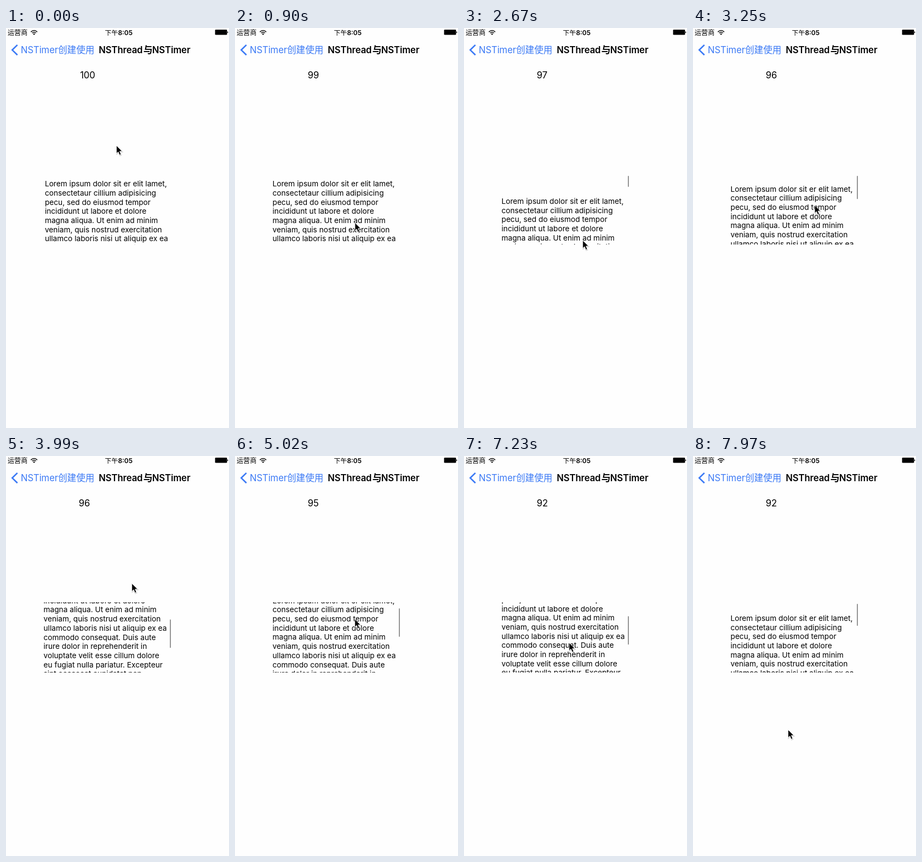
Write an HTML page that moves like this. It is 407x730 px and loops after 8 s.

```html
<!DOCTYPE html>
<html lang="zh-CN">
<head>
<meta charset="utf-8">
<title>NSThread与NSTimer</title>
<style>
  html, body { margin: 0; width: 100%; height: 100%; overflow: hidden; background: #fefefe; }
  svg { display: block; width: 407px; height: 730px; }
  text { font-family: Inter, "Noto Sans CJK SC", "Noto Sans CJK", sans-serif; letter-spacing: -.1px; white-space: pre; }
  .nav { font-size: 16.7px; }
  .blue { fill: #3c7af5; }
  .bold { font-weight: 600; }
  .status { font-size: 12.2px; }
  .time { font-size: 11.9px; letter-spacing: 0; }
  #body text { font-size: 13.7px; letter-spacing: 0; }
</style>
</head>
<body>
<svg viewBox="0 0 407 730" xmlns="http://www.w3.org/2000/svg">
  <defs>
    <clipPath id="view"><rect x="60" y="267" width="245" height="128.3"/></clipPath>
    <path id="arrow" d="M0 0V14.6L3.3 11.5L5.7 17.2L8.4 16.1L6 10.5H10.6Z"/>
  </defs>
  <rect width="407" height="730" fill="#fefefe"/>

  <text class="status" x="3" y="13">运营商</text>
  <g fill="none" stroke="#000" stroke-width="1.5">
    <path d="M45.4 7.1Q51.2 1.9 57 7.1"/>
    <path d="M47.6 9.3Q51.2 6.1 54.8 9.3"/>
  </g>
  <path d="M51.2 12.8L49.2 10.7Q51.2 9.1 53.2 10.7Z"/>
  <text class="time" x="180.5" y="13" font-weight="500">下午</text>
  <text class="time bold" x="204.4" y="13">8:05</text>
  <rect x="381.6" y="3" width="21.8" height="9.6" rx="1.4"/>
  <path d="M403.8 6.2Q405.4 6.6 405.4 7.8T403.8 9.4Z"/>

  <path d="M20.8 30.9L11.4 40.1L20.8 49.3" fill="none" stroke="#3c7af5" stroke-width="2.7"/>
  <text class="nav blue" x="27" y="46">NSTimer</text>
  <text class="nav blue" x="95" y="46">创建使用</text>
  <text class="nav bold" x="169.3" y="46">NSThread</text>
  <text class="nav bold" x="250.7" y="46">与</text>
  <text class="nav bold" x="266.8" y="46">NSTimer</text>

  <text id="count" class="nav" y="92"></text>
  <g clip-path="url(#view)"><g id="body"></g></g>
  <rect id="bar" x="299" width="2" rx="1" fill="#969696"/>
  <g id="cursor">
    <use href="#arrow" x=".6" y="1.4" opacity=".16" stroke="#000" stroke-width="1.4"/>
    <use href="#arrow" stroke="#fff" stroke-width=".9"/>
  </g>
</svg>
<script>
const LOOP = 8000, STEP = 147.55;
const LINE = 16.7, TOP = 289.1, BAR = 52, VIEW = 128;
const el = id => document.getElementById(id);

const lines = `Lorem ipsum dolor sit er elit lamet,
consectetaur cillium adipisicing
pecu, sed do eiusmod tempor
incididunt ut labore et dolore
magna aliqua. Ut enim ad minim
veniam, quis nostrud exercitation
ullamco laboris nisi ut aliquip ex ea
commodo consequat. Duis aute
irure dolor in reprehenderit in
voluptate velit esse cillum dolore
eu fugiat nulla pariatur. Excepteur
sint occaecat cupidatat non
proident, sunt in culpa qui officia
deserunt mollit anim id est
laborum. Nam liber te conscient to
factor tum poen legum odioque
civiuda.`.split("\n");

lines.forEach((line, i) => {
  const text = document.createElementNS("http://www.w3.org/2000/svg", "text");
  text.setAttribute("y", TOP + i * LINE);
  text.textContent = line;
  el("body").append(text);
});

// Turning points of the pointer: step, x, y
const turns = [
  [2, 201.5, 214.5], [9, 230, 445], [13, 226.7, 283], [18, 216.7, 387.5],
  [27, 229.7, 232.5], [31, 219, 410], [34, 218.7, 297.7], [37, 221.5, 280],
  [40, 221.5, 281], [42, 206, 411], [46, 200, 270], [54, 173.5, 499.5]
];

function pointer(step) {
  const n = turns.findIndex(t => t[0] >= step);
  if (n === 0) return turns[0].slice(1);
  const [t0, x0, y0] = turns[n - 1], [t1, x1, y1] = turns[n];
  const p = (1 - Math.cos(Math.PI * (step - t0) / (t1 - t0))) / 2;
  return [x0 + (x1 - x0) * p, y0 + (y1 - y0) * p];
}

const PRESS = 14, RELEASE = 53;
const grabY = step => step < 30 ? 303 : step < 42 ? 318.2 : 396.5;

// Content follows the pointer, stretches past the top and springs back on release.
function scrollAt(step, y) {
  if (step < PRESS) return 0;
  const pull = grabY(step) - y;
  if (pull > 0) return pull;
  return pull / (2 - pull / VIEW) * Math.exp(-1.14 * Math.max(0, step - RELEASE));
}

// The screen refreshes only once per STEP.
function draw(ms) {
  const step = Math.min(54, Math.floor(ms / STEP));
  const [x, y] = pointer(step);
  const scroll = scrollAt(step, y);
  const shift = step ? 0 : 2.4;

  el("count").textContent = 100 - Math.floor(step * STEP / 1000 + 0.9);
  el("count").setAttribute("x", 132.8 + shift);
  el("body").setAttribute("transform", `translate(${68.5 + shift} ${-scroll})`);
  el("cursor").setAttribute("transform", `translate(${x} ${y})`);

  const bar = el("bar");
  bar.setAttribute("y", 269.8 + Math.max(0, scroll) * 0.405);
  bar.setAttribute("height", BAR + Math.min(0, scroll));
  bar.setAttribute("visibility", step < PRESS ? "hidden" : "visible");
}

const start = performance.now();
function tick() {
  draw((performance.now() - start) % LOOP);
  requestAnimationFrame(tick);
}
tick();
</script>
</body>
</html>
```
